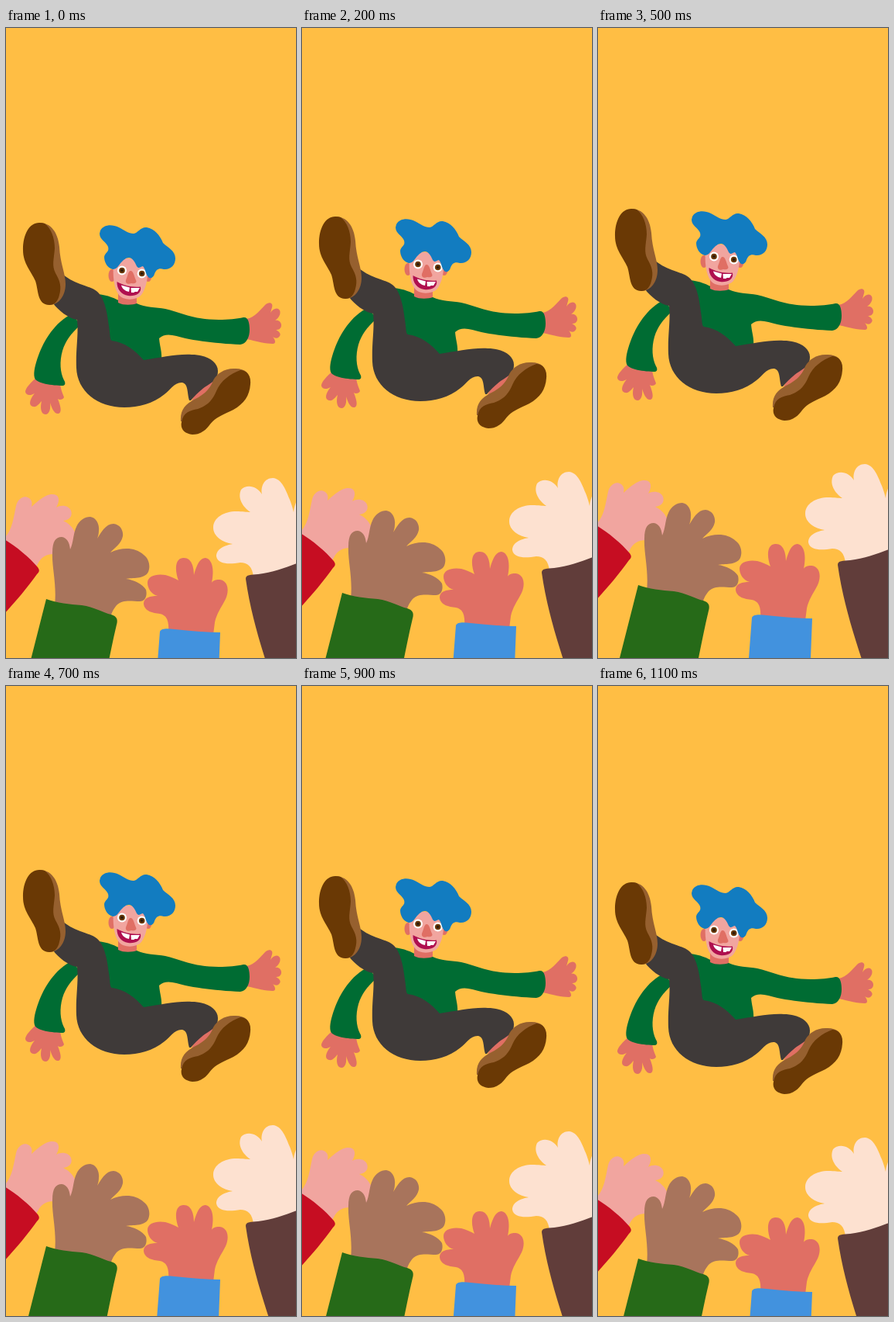
Write an HTML page that moves like this. It is 375 by 812 pixels and loops after 1.2 s.

```html
<!DOCTYPE html>
<html lang="en">
<head>
<meta charset="utf-8">
<title>Crowd toss</title>
<style>
  html, body { margin: 0; width: 100%; height: 100%; overflow: hidden; background: #ffbe44; }
  svg { display: block; width: 375px; height: 812px; }

  .bg { fill: #ffbe44; }
  .skin { fill: #e06f64; }
  .pink { fill: #f1a59f; }
  .tan { fill: #a8745c; }
  .pale { fill: #fde1d0; }
  .shirt { fill: #006c33; }
  .pants { fill: #3f3a39; }
  .sole { fill: #6a3905; }
  .side { fill: #96602f; }
  .hair { fill: #127cc0; }
  .mouth { fill: #af0f4f; }
  .white { fill: #fff; }
  .iris { fill: #6a3905; }
  .pupil { fill: #2c1a0c; }
  .red { fill: #c60d22; }
  .green { fill: #266a18; }
  .blue { fill: #4292de; }
  .maroon { fill: #613d3a; }

  /* Held poses, 100 ms each, with a pause at the top */
  .scene { animation: bounce 1200ms step-end infinite; }
  @keyframes bounce {
    0% { transform: translateY(18px); }
    8.33% { transform: translateY(14px); }
    16.66% { transform: translateY(10px); }
    25% { transform: translateY(6px); }
    33.33% { transform: translateY(2px); }
    41.66% { transform: translateY(0); }
    58.33% { transform: translateY(4px); }
    66.66% { transform: translateY(8px); }
    75% { transform: translateY(12px); }
    83.33% { transform: translateY(16px); }
    91.66% { transform: translateY(20px); }
    100% { transform: translateY(18px); }
  }
</style>
</head>
<body>
<svg viewBox="0 0 375 812" aria-hidden="true">
  <rect class="bg" width="375" height="812"/>
  <g class="scene">
    <g id="jumper">
      <path class="skin" d="M40 432C33 438 25 446 25 451C26 456 32 456 37 453C30 461 29 469 35 470C40 471 43 466 46 463C44 471 45 480 51 480C56 480 58 473 57 465C59 471 62 480 68 479C73 477 70 468 67 460C69 462 74 461 75 458C74 454 71 450 70 440Z"/>
      <path class="skin" d="M311 357C322 355 329 345 335 339C340 334 346 336 344 342L342 349C345 344 351 341 354 346C356 351 352 356 348 359C352 358 356 361 356 365C356 370 352 371 349 371C353 373 356 376 354 379C351 383 348 382 345 380C349 385 349 389 345 389C336 389 325 386 311 383Z"/>
      <path class="shirt" d="M86 350C63 361 49 385 42 404C38 415 35 426 37 433C39 440 60 443 74 443C77 442 77 439 75 436C70 426 69 412 73 398C77 385 84 376 96 365Z"/>
      <path class="shirt" d="M117 325C133 326 141 331 150 335L169 337C180 342 194 342 206 344C228 349 242 358 275 358C288 358 298 357 307 355C313 354 315 362 315 371C315 380 311 389 303 390C280 389 250 386 232 382C218 378 206 374 198 382C199 394 202 398 201 412L170 415L120 380Z"/>
      <path class="skin" d="M240 463C244 452 256 441 270 436C268 449 254 456 240 463Z"/>
      <path class="pants" d="M74 300C90 313 108 314 117 321C128 330 131 350 133 366C135 378 134 384 137 385C155 388 165 396 178 410C200 407 220 402 240 403C260 403 274 412 274 424C274 434 269 437 263 441C253 447 246 454 239 462H237C234 452 236 441 228 439C218 438 212 449 205 454C190 466 172 471 153 471C118 471 92 450 91 420C90 395 94 378 92 358C80 356 68 346 61 337Z"/>
      <path class="side" d="M43 233C58 233 67 245 69 264C70 286 77 298 77 312C77 326 69 339 56 339L45 320Z"/>
      <path class="sole" d="M43 233C30 233 22 248 22 268C22 286 33 296 38 308C42 319 40 339 56 339C62 339 67 335 69 326C72 316 70 308 64 298C59 288 62 280 63 266C63 252 58 240 50 234Q47 233 43 233Z"/>
      <path class="side" d="M226 489C225 474 232 467 243 461C255 455 264 448 268 436C273 427 283 420 297 421C309 421 316 427 316 439L260 490Z"/>
      <path class="sole" d="M227 490C229 478 237 475 248 473C260 469 267 462 272 450C278 436 290 428 303 423C312 423 317 431 316 441C315 456 308 466 294 474C280 481 270 484 263 494C257 502 250 506 241 506C231 505 225 499 227 490Z"/>

      <path class="skin" d="M145 322V336C152 340 164 339 169 337V322Z"/>
      <ellipse class="skin" cx="137" cy="301" rx="4.5" ry="8"/>
      <ellipse class="skin" cx="184" cy="301" rx="4.5" ry="8"/>
      <path class="pink" d="M139 286C140 276 180 276 183 292C184 304 181 318 175 326C169 333 152 334 146 326C139 317 138 300 139 286Z"/>
      <path class="skin" d="M161 295C165 295 166 303 168 307C170 311 165 312 162 311C158 313 154 311 155 307C157 303 158 295 161 295Z"/>
      <path class="mouth" d="M143.5 309C152 314 163 316.5 174 315.5C176 325 166 328 158 327C149 326 143 318 143.5 309Z"/>
      <path class="white" d="M149 313.5L160 316.5L159 322C154 321 150 318 149 313.5ZM161.5 317H166V323H162ZM166 317H173L170 322H166Z"/>
      <g id="eye">
        <circle class="white" cx="150" cy="294.5" r="6"/>
        <circle class="iris" cx="150" cy="294.5" r="3.8"/>
        <circle class="pupil" cx="150" cy="294.5" r="1.8"/>
      </g>
      <use href="#eye" x="25.7" y="4"/>
      <path class="hair" d="M122 243C127 235 137 235 146 239C154 243 158 247 165 247C171 246 174 238 182 239C192 241 199 249 203 259C209 265 219 269 219 279C219 288 212 294 204 293C197 291 194 294 192 299C191 303 188 305 185 304C180 300 181 293 177 289C173 290 172 293 169 289C166 282 163 278 159 278C155 278 152 281 149 284C145 289 143 293 138 293C131 291 127 284 127 277C128 271 134 271 132 264C130 258 121 255 121 247Z"/>
    </g>

    <g id="crowd">
      <path class="pink" d="M0 637C8 628 10 612 13 598C15 589 23 583 30 588C34 591 34 595 33 599C38 595 47 585 58 583C69 582 70 590 66 598L65 600C71 596 81 597 84 604C87 612 80 617 74 617C80 620 86 624 90 634V660H62C52 660 45 664 41 673L36 680L0 650Z"/>
      <path class="red" d="M-2 641C14 651 30 664 41 677C44 681 43 683 40 686C28 703 14 719-2 737Z"/>

      <path class="tan" d="M63 726C66 700 59 676 60 658C60 644 64 638 72 638C79 639 82 645 83 654C87 646 87 633 91 625C95 616 102 612 109 612C117 613 121 622 120 630C120 634 119 637 118 640C123 632 129 621 139 621C148 622 152 630 151 637C149 647 141 651 135 658C150 651 167 651 178 661C185 666 187 676 184 683C179 693 163 690 155 692C165 693 177 699 181 706C183 714 180 721 173 721C163 721 151 718 143 726C138 732 136 737 134 746Z"/>
      <path class="green" d="M52 718C66 723 82 725 98 726C114 728 126 736 136 738C143 740 145 744 143 751C138 772 134 792 130 812L124 840H21L28 812Z"/>

      <path class="skin" d="M210 762C211 748 209 739 199 737C190 736 179 734 178 724C178 716 187 714 196 714C188 712 183 704 183 697C183 688 195 685 206 687C213 689 218 691 223 694C219 684 217 666 229 665C240 664 243 677 243 687C246 676 250 665 258 665C268 667 269 682 266 697C268 693 276 692 280 694C288 698 288 709 284 718C279 728 272 737 270 748L268 764Z"/>
      <path class="blue" d="M199 760C201 755 210 756 218 757C238 759 258 761 277 761L275 812V840H195V812Z"/>

      <path class="pale" d="M320 690C319 676 312 671 303 671C290 673 274 674 272 663C272 653 283 649 293 647C280 645 268 637 268 626C268 613 282 605 298 605C306 605 311 606 316 606C306 599 299 588 304 577C312 569 325 573 331 583C329 573 334 562 345 562C357 563 362 578 367 590C370 598 371 602 372 606C372 601 374 596 376 591V690Z"/>
      <path class="maroon" d="M310 692C310 686 317 687 326 686C344 684 360 678 376 672V840H350C333 790 317 742 310 692Z"/>
    </g>
  </g>
</svg>
</body>
</html>
```
